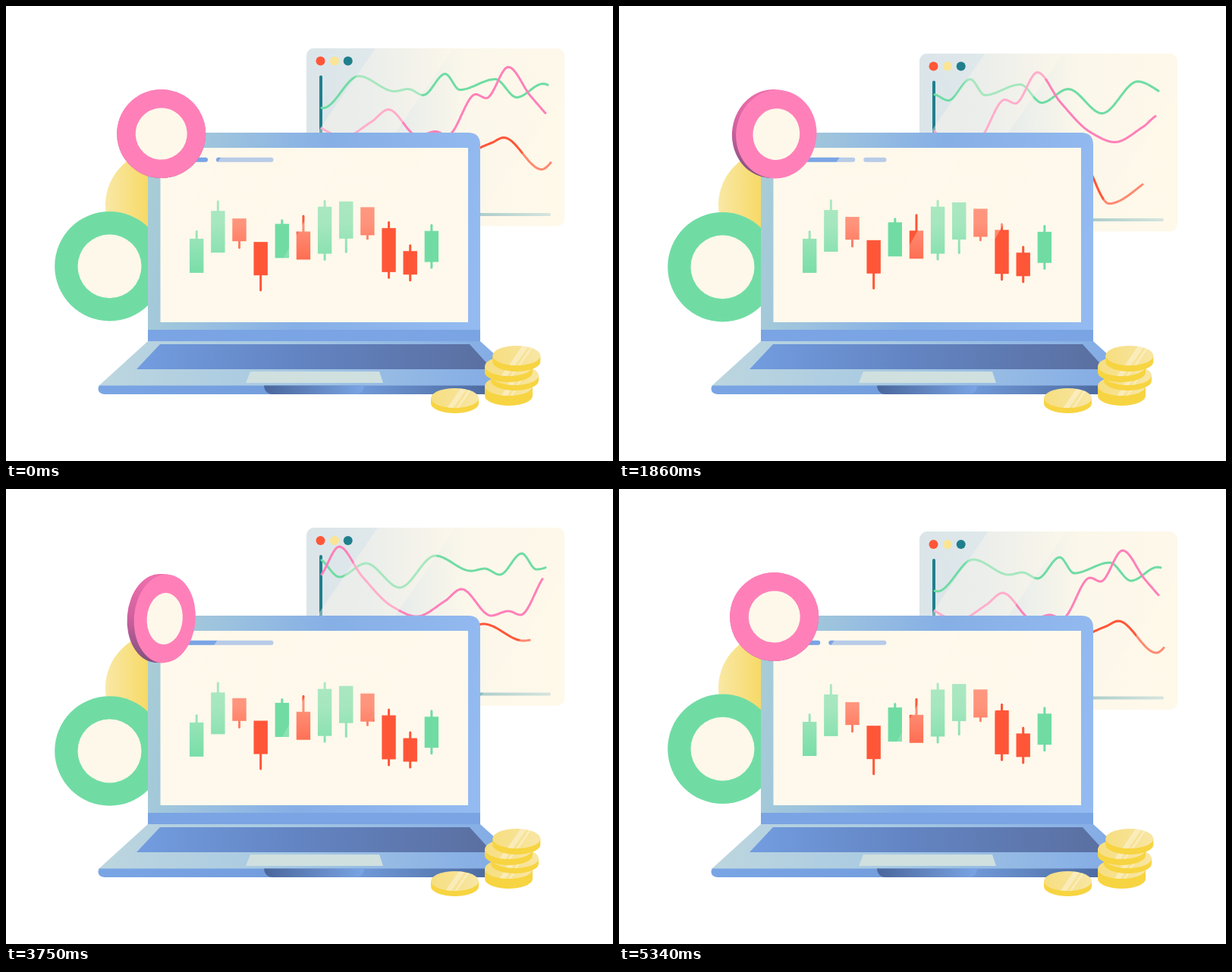
These frames come from a looping animation (800 px wide and 600 px high, 5370 ms). An HTML page:

```html
<!DOCTYPE html>
<html lang="en">
<head>
<meta charset="utf-8">
<title>Trading laptop</title>
<style>
  html, body { margin: 0; width: 100%; height: 100%; overflow: hidden; background: #fff; }
  svg { display: block; width: 100vw; height: 100vh; }
</style>
</head>
<body>
<svg viewBox="0 0 800 600" xmlns="http://www.w3.org/2000/svg">
  <defs>
    <linearGradient id="sun"><stop offset="0" stop-color="#f9e8a6"/><stop offset=".5" stop-color="#f6d553"/></linearGradient>
    <linearGradient id="lid" gradientUnits="userSpaceOnUse" x1="187" y1="250" x2="625" y2="330">
      <stop offset="0" stop-color="#a8cdd6"/><stop offset=".18" stop-color="#9dc3de"/>
      <stop offset=".5" stop-color="#86afe6"/><stop offset="1" stop-color="#94bbf1"/>
    </linearGradient>
    <linearGradient id="deck"><stop offset="0" stop-color="#bdd6df"/><stop offset=".4" stop-color="#a9cae2"/><stop offset="1" stop-color="#7ea8e6"/></linearGradient>
    <linearGradient id="keys"><stop offset="0" stop-color="#729de0"/><stop offset=".45" stop-color="#6384c2"/><stop offset="1" stop-color="#5a6fa0"/></linearGradient>
    <linearGradient id="front"><stop offset="0" stop-color="#7aa5e5"/><stop offset=".6" stop-color="#709ad9"/><stop offset=".9" stop-color="#4d6ba1"/></linearGradient>
    <linearGradient id="notch"><stop offset="0" stop-color="#4a669c"/><stop offset="1" stop-color="#7aa5e5"/></linearGradient>
    <linearGradient id="card">
      <stop offset="0" stop-color="#dbe5e9"/><stop offset=".25" stop-color="#dfe8eb"/>
      <stop offset=".62" stop-color="#fbf7ea"/><stop offset="1" stop-color="#fef8ea"/>
    </linearGradient>
    <linearGradient id="axis" gradientUnits="userSpaceOnUse" x1="625" y1="0" x2="718" y2="0">
      <stop offset="0" stop-color="#86b9bd"/><stop offset="1" stop-color="#c3dbd8"/>
    </linearGradient>
    <linearGradient id="rim" x2="0" y2="1"><stop offset="0" stop-color="#f070ad"/><stop offset=".5" stop-color="#d0619f"/><stop offset="1" stop-color="#81507f"/></linearGradient>
    <linearGradient id="glare" gradientUnits="userSpaceOnUse" x1="0" y1="190" x2="0" y2="365">
      <stop offset="0" stop-color="#fef8ea" stop-opacity=".48"/><stop offset=".55" stop-color="#fef8ea" stop-opacity=".38"/>
      <stop offset="1" stop-color="#fef8ea" stop-opacity="0"/>
    </linearGradient>
    <linearGradient id="goldTop"><stop offset="0" stop-color="#f6de80"/><stop offset="1" stop-color="#f8e6a4"/></linearGradient>
    <clipPath id="cardClip"><rect x="396" width="340" height="235" rx="10"/></clipPath>
    <clipPath id="screenClip"><rect x="203.5" y="187" width="405.5" height="230"/></clipPath>
    <clipPath id="goldClip"><ellipse rx="31.5" ry="13"/></clipPath>
  </defs>

  <circle cx="204" cy="262.5" r="73" fill="url(#sun)"/>
  <g id="greenCoin">
    <circle r="72.3" fill="#70dca4"/>
    <circle r="42" fill="#fef8ea"/>
  </g>

  <g id="window" clip-path="url(#cardClip)">
    <rect x="396" width="340" height="235" fill="url(#card)"/>
    <path d="M415 38V200" stroke="#207f8d" stroke-width="4" stroke-linecap="round"/>
    <path d="M560 219.5H716" stroke="url(#axis)" stroke-width="4" stroke-linecap="round"/>
    <g id="lines" fill="none" stroke-width="3" stroke-linecap="round" stroke-linejoin="round"></g>
    <g id="cardGlare" fill="#fef8ea">
      <path d="M487 0H590L428 235H325Z" opacity=".38"/>
      <path d="M777 0H900V235H614Z" opacity=".32"/>
    </g>
    <circle cx="414.5" cy="17" r="6" fill="#ff5638"/>
    <circle cx="433" cy="17" r="6" fill="#fae596"/>
    <circle cx="450.7" cy="17" r="6" fill="#207f8d"/>
  </g>

  <path d="M187 442V183Q187 167 203 167H609Q625 167 625 183V442Z" fill="url(#lid)"/>
  <rect x="187" y="427" width="438" height="15" fill="#7aa4e3"/>
  <rect x="203.5" y="187" width="405.5" height="230" fill="#fef9ec"/>
  <g clip-path="url(#screenClip)">
    <g id="bars" stroke="#7aa4e5" stroke-width="6" stroke-linecap="round"></g>
    <g id="candles" stroke-width="3" stroke-linecap="round"></g>
    <g id="screenGlare" fill="url(#glare)">
      <path d="M292 187H403L244 417H133Z"/>
      <path d="M448 187H556L426 417H318Z"/>
    </g>
  </g>

  <path d="M187 442H625L691 502H121Z" fill="url(#deck)"/>
  <path d="M203 446H611L641 479H172Z" fill="url(#keys)"/>
  <path d="M322 482H492L497 497H316Z" fill="#cfe0df"/>
  <path d="M123 500.500H690V512H130Q121 511 121.500 504Z" fill="url(#front)"/>
  <path d="M340 500.500H472Q471 512 460 512H352Q341 512 340 500.500Z" fill="url(#notch)"/>

  <g id="pinkCoin">
    <g fill="url(#rim)">
      <ellipse id="rimBack" ry="58.5"/>
      <rect id="rimSide" y="-58.5" height="117"/>
    </g>
    <ellipse id="face" ry="58.5" fill="#ff80b9"/>
    <ellipse id="emblem" ry="34" fill="#fef8ea"/>
  </g>
  <g id="goldCoins"></g>
</svg>
<script>
const LOOP = 5370, TAU = Math.PI * 2;
const GREEN = '#70dca4', PINK = '#ff80b9', RED = '#ff5638';
const $ = id => document.getElementById(id);

function set(node, attrs) {
  for (const key in attrs) node.setAttribute(key, attrs[key]);
}
function add(parent, tag, attrs = {}) {
  const node = document.createElementNS('http://www.w3.org/2000/svg', tag);
  set(node, attrs);
  return parent.appendChild(node);
}
function move(id, x, y) {
  set($(id), { transform: `translate(${x} ${y})` });
}

// Smooth periodic curve through a few [x, y] points without overshoot.
function loopCurve(points, period) {
  const n = points.length, first = points[0][0];
  const at = i => {
    const turn = Math.floor(i / n), [x, y] = points[i - turn * n];
    return [x + turn * period, y];
  };
  const slope = i => {
    const a = at(i), b = at(i + 1);
    return (b[1] - a[1]) / (b[0] - a[0]);
  };
  const tangent = i => {
    const s = slope(i - 1), r = slope(i);
    return s * r <= 0 ? 0 : 2 * s * r / (s + r);
  };
  return x => {
    const u = first + (((x - first) % period) + period) % period;
    let i = 0;
    while (i < n - 1 && points[i + 1][0] <= u) i++;
    const a = at(i), b = at(i + 1), h = b[0] - a[0], k = (u - a[0]) / h;
    const ease = k * k * (3 - 2 * k);
    return a[1] + (b[1] - a[1]) * ease
      + h * k * (1 - k) * (tangent(i) * (1 - k) - tangent(i + 1) * k);
  };
}

// Each line scrolls left by one period per loop; its tip reaches further out around the loop start.
function chartLine(color, period, tip, reach, turns) {
  const y = loopCurve(turns, period), node = add($('lines'), 'path', { stroke: color });
  return t => {
    const shift = period * t / LOOP, end = tip + reach * Math.cos(TAU / 2 * t / LOOP) ** 10;
    const points = [];
    for (let x = 416; x < end + 2; x += 2) {
      const px = Math.min(x, end);
      points.push(`${px.toFixed(2)} ${y(px + shift).toFixed(2)}`);
    }
    set(node, { d: 'M' + points.join('L') });
  };
}
const lines = [
  chartLine(GREEN, 334.5, 711, 3, [
    [418, 79], [465, 37], [512, 57], [530, 54], [550, 62], [579, 34], [598, 55], [645, 41], [673, 65], [708, 47]]),
  chartLine(RED, 370, 690, 28, [
    [640, 125], [656, 118], [706, 160], [735, 136], [774, 198], [828, 166], [888, 127], [940, 149]]),
  chartLine(PINK, 319, 707, 4, [
    [445, 117], [482, 97], [504, 81], [543, 116], [566, 110], [582, 115], [619, 61], [633, 66], [662, 25], [692, 64], [732, 104]])
];

// [color, middle, body height, wick]: positive wicks rise, negative hang, zero gives a short one at both ends.
const candles = [
  [GREEN, 339, 45, 11], [GREEN, 305.5, 55, 14], [RED, 299, 30, -10], [RED, 332, 44, -21],
  [GREEN, 304, 45, 6], [RED, 307, 37, 22], [GREEN, 286, 62, 0], [GREEN, 274.5, 49, -19],
  [RED, 280, 37, -6], [RED, 323, 58, 0], [RED, 344.5, 31, 0], [GREEN, 326, 41, 0]
].map(([color, middle, height, wick], i) => {
  const half = height / 2, x = 251.2 + 28.15 * i;
  const above = wick ? Math.max(wick, 0) : 9, below = wick ? Math.max(-wick, 0) : 9;
  const node = add($('candles'), 'g', { fill: color, stroke: color });
  add(node, 'rect', { x: x - 9.2, y: -half, width: 18.4, height, stroke: 'none' });
  if (above) add(node, 'path', { d: `M${x} ${1.5 - half - above}V0` });
  if (below) add(node, 'path', { d: `M${x} 0V${half + below - 1.5}` });
  return t => {
    const wave = Math.cos(TAU * ((t - 930) * 3 / LOOP - i / 12));
    set(node, { transform: `translate(0 ${middle + 9.7 * wave})` });
  };
});

const bars = [0, 1, 2].map(() => add($('bars'), 'path'));

function goldCoin(x, y, depth) {
  const coin = add($('goldCoins'), 'g', { transform: `translate(${x} ${y})` });
  add(coin, 'path', { d: `M-31.500 0V${depth}A31.500 13 0 0 0 31.500 ${depth}V0Z`, fill: '#f7d441' });
  add(coin, 'ellipse', { rx: 31.5, ry: 13, fill: 'url(#goldTop)' });
  const clip = add(coin, 'g', { 'clip-path': 'url(#goldClip)' });
  return add(clip, 'path', { d: 'M-10 13L8 -13H16L-2 13ZM2 13L20 -13H23L5 13Z', fill: '#fdf4d4', opacity: .6 });
}
const shines = [
  goldCoin(662.5, 501, 13), goldCoin(670.5, 487, 7), goldCoin(662.5, 475, 8),
  goldCoin(672.8, 461, 8), goldCoin(591.5, 517, 7)
];

const yawAt = loopCurve([[0, 0], [950, -83], [1860, -25], [2685, 82], [3510, -25], [4420, -83]], LOOP);

function drawPinkCoin(t) {
  const yaw = yawAt(t) * Math.PI / 180, sin = Math.sin(yaw), cos = Math.cos(yaw);
  const roll = -14 * Math.cos(TAU * t / LOOP), half = 6.3 * sin;
  set($('pinkCoin'), { transform: `translate(204.7 ${168.5 + 8 * sin ** 4}) rotate(${roll})` });
  set($('rimBack'), { cx: half, rx: 58.5 * cos });
  set($('rimSide'), { x: -Math.abs(half), width: 2 * Math.abs(half) });
  set($('face'), { cx: -half, rx: 58.5 * cos });
  set($('emblem'), { cx: -half, rx: 34 * cos });
}

function drawBars(t) {
  const pitch = 130.6, start = 277 - 2 * pitch + pitch * t / LOOP;
  bars.forEach((bar, i) => {
    const left = Math.max(start + pitch * i, 210) + 3;
    const right = Math.min(start + pitch * (i + 1) - 11, 352.5) - 3;
    set(bar, { d: right > left ? `M${left} 202.700H${right}` : '' });
  });
}

function draw(t) {
  const sway = Math.sin(TAU * 2 * t / LOOP);
  move('window', 0, 55.5 - 7.5 * sway);
  move('cardGlare', 5 * sway, 0);
  move('screenGlare', -8 * sway, 0);
  move('greenCoin', 136.5, 342.6 + 4.2 * Math.sin(TAU * 3 * t / LOOP + .14));
  lines.forEach(drawLine => drawLine(t));
  candles.forEach(drawCandle => drawCandle(t));
  shines.forEach(shine => set(shine, { transform: `translate(${-4 * sway} 0)` }));
  drawBars(t);
  drawPinkCoin(t);
}

const began = performance.now();
function tick() {
  draw((performance.now() - began) % LOOP);
  requestAnimationFrame(tick);
}
tick();
</script>
</body>
</html>
```
